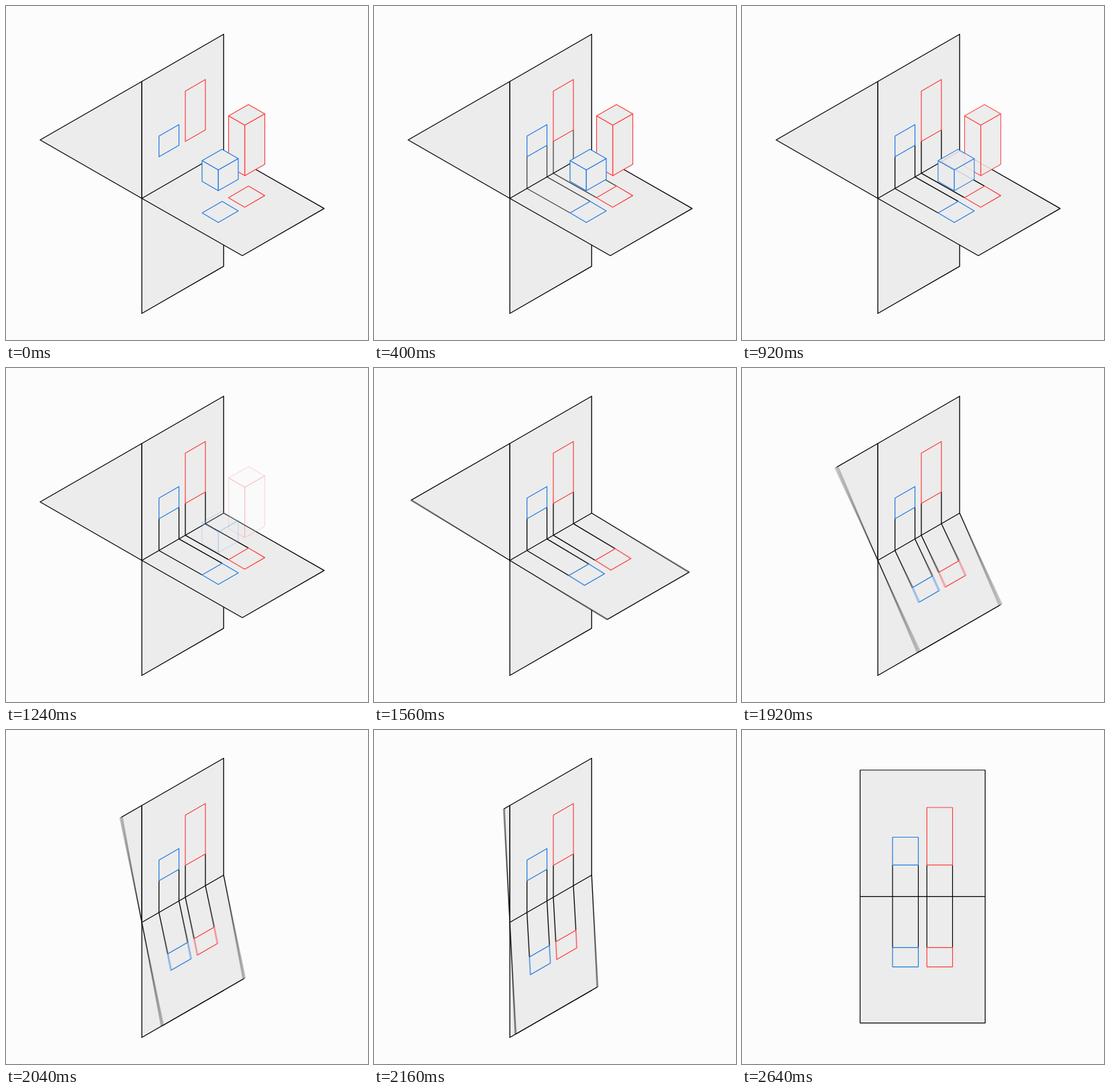
An HTML page with a canvas that plays this animation: 541 px wide and 500 px high, repeating every 4.32 s.

```html
<!DOCTYPE html>
<html lang="en">
<head>
<meta charset="utf-8">
<title>Unfolding two projection planes</title>
<style>
  html, body { margin: 0; width: 100%; height: 100%; overflow: hidden; background: #fcfcfc; }
  canvas { display: block; width: 541px; height: 500px; }
</style>
</head>
<body>
<canvas id="stage"></canvas>
<script>
const W = 541, H = 500, LOOP = 4320, STEP = 40, SHUTTER = 20, SAMPLES = 10;
const BG = '#fcfcfc', FILL = '#ececec', BLACK = '#000', BLUE = '#1f7ae0', RED = '#ff3c3c';

const dpr = window.devicePixelRatio || 1;
const sizeUp = c => { c.width = W * dpr; c.height = H * dpr; return c; };
const stage = sizeUp(document.getElementById('stage'));
const layer = sizeUp(document.createElement('canvas'));
const out = stage.getContext('2d');
const g = layer.getContext('2d');
g.scale(dpr, dpr);
g.lineJoin = 'round';

const clamp = x => Math.min(1, Math.max(0, x));
const span = (t, a, b) => clamp((t - a) / (b - a));
const mix = (a, b, s) => a + (b - a) * s;
const add = (p, q) => [p[0] + q[0], p[1] + q[1]];

// Ease curve (x1, 0, x2, 1), solved by bisection.
function ease(x, x1 = 0.31, x2 = 0.646) {
  let lo = 0, hi = 1;
  for (let i = 0; i < 24; i++) {
    const u = (lo + hi) / 2, v = 1 - u;
    if (3 * x1 * u * v * v + 3 * x2 * u * u * v + u * u * u < x) lo = u; else hi = u;
  }
  return lo * lo * (3 - 2 * lo);
}
const foldAt = t => {
  const x = span(t, 1482, 2283);
  return x <= 0 ? 0 : x >= 1 ? 1 : ease(x);
};

function trace(points, color, fill, closed = true, width = 1.3) {
  g.beginPath();
  points.forEach(p => g.lineTo(p[0], p[1]));
  if (closed) g.closePath();
  if (fill) { g.fillStyle = fill; g.fill(); }
  g.strokeStyle = color;
  g.lineWidth = width;
  g.stroke();
}
const box = (x0, y0, x1, y1) => [[x0, y0], [x1, y0], [x1, y1], [x0, y1]];

// Hinge between the planes; x gives a point on it.
const X0 = 203, X1 = 325.3, SLOPE = 70.7 / 122.3;
const hinge = x => [x, 288 - (x - X0) * SLOPE];
const up = (x, dy) => add(hinge(x), [0, -dy]);

// Offsets on the turning plane: start x, start y, end y.
const EDGE = [150.2, 85.8, 172.3], NEAR = [64.5, 36.5, 68.5], FAR = [88.7, 50.8, 95.7];
const swing = ([x, y, end], s) => [x * (1 - s), mix(y, end, s)];

const shapes = [
  { color: BLUE, l: 228.6, r: 258.5, low: 47.5, high: 78.5 },
  { color: RED, l: 268, r: 298, low: 47.6, high: 123 }
];

// Solids: left corner of the top face and height.
const solids = [
  { color: RED, x: 332.6, y: 164.5, h: 75.5 },
  { color: BLUE, x: 293, y: 231.5, h: 31 }
];

function drawSolid({ color, x, y, h }) {
  const a = [x, y], b = add(a, [24.3, 14]), c = add(b, [29.8, -17]), d = add(a, [29.8, -17]);
  const down = p => add(p, [0, h]);
  [[a, b, c, d], [a, b, down(b), down(a)], [b, c, down(c), down(b)]]
    .forEach(face => trace(face, color, FILL, true, 1.2));
}

function drawSpace(t) {
  const s = foldAt(t);
  const edge = swing(EDGE, s), near = swing(NEAR, s), far = swing(FAR, s);
  const tip = [mix(51, X0, s), mix(200.5, 113, s)];

  trace([tip, up(X0, 175), hinge(X0)], BLACK, FILL);
  trace([up(X0, 175), up(X1, 175), up(X1, -172.3), up(X0, -172.3)], BLACK, FILL);
  trace([hinge(X0), hinge(X1), add(hinge(X1), edge), add(hinge(X0), edge)], BLACK, FILL);

  g.globalAlpha = span(t, 0, 560);
  for (const { l, r, low } of shapes)
    for (const x of [l, r])
      trace([up(x, low), hinge(x), add(hinge(x), near)], BLACK, null, false);
  g.globalAlpha = 1;

  for (const { color, l, r, low, high } of shapes) {
    trace([up(l, low), up(l, high), up(r, high), up(r, low)], color, null, true, 1.2);
    trace([add(hinge(l), near), add(hinge(r), near), add(hinge(r), far), add(hinge(l), far)],
      color, null, true, 1.2);
  }

  const shown = 1 - span(t, 860, 1320);
  if (shown > 0) {
    g.globalAlpha = shown;
    solids.forEach(drawSolid);
    g.globalAlpha = 1;
  }
}

function drawFlat() {
  trace(box(176.5, 60, 363.4, 438.7), BLACK, FILL, true, 1.2);
  trace([[176.5, 249.3], [363.4, 249.3]], BLACK, null, false, 1.2);
  for (const [color, l, r, top] of [[BLUE, 225, 263.5, 160.5], [RED, 276.3, 314.6, 116]]) {
    for (const x of [l, r]) trace([[x, 202.2], [x, 325.6]], BLACK, null, false, 1.2);
    trace(box(l, top, r, 202.2), color, null, true, 1.2);
    trace(box(l, 325.6, r, 354.6), color, null, true, 1.2);
  }
}

function drawScene(t) {
  g.fillStyle = BG;
  g.fillRect(0, 0, W, H);
  if (t >= 2640) drawFlat(); else drawSpace(t);
}

// Averages several moments while the plane turns, for motion blur.
function render(t) {
  const n = t > 1470 && t < 2300 ? SAMPLES : 1;
  for (let i = 0; i < n; i++) {
    drawScene(n > 1 ? t + SHUTTER * ((i + 0.5) / n - 0.5) : t);
    out.globalAlpha = 1 / (i + 1);
    out.drawImage(layer, 0, 0);
  }
}

const start = performance.now();
let last = -1;
function tick() {
  const t = Math.floor(((performance.now() - start) % LOOP) / STEP) * STEP;
  if (t !== last) render(last = t);
  requestAnimationFrame(tick);
}
tick();
</script>
</body>
</html>
```
